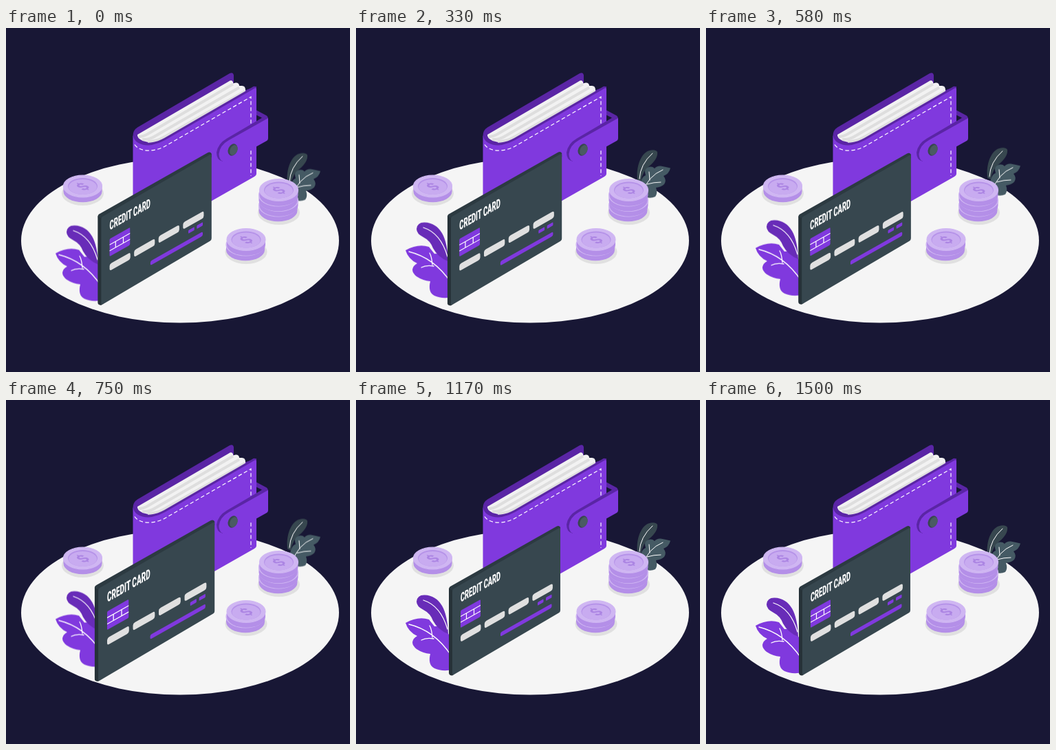
An HTML page that plays this animation: 500x500 px, repeating every 1.54 s.

```html
<!DOCTYPE html>
<html lang="en">
<head>
<meta charset="utf-8">
<title>Wallet and card</title>
<style>
  html, body { margin: 0; width: 100%; height: 100%; overflow: hidden; background: #181735; }
  svg { display: block; width: 100vw; height: 100vh; }
  text { font-family: Roboto, "Liberation Sans", sans-serif; font-weight: 900; }
  #card { transform-origin: 216px 292px; }
  .line { fill: none; stroke: #fff; stroke-linecap: round; }
  .flat { stroke-linecap: butt; }
</style>
</head>
<body>
<svg viewBox="0 0 500 500">
  <ellipse cx="253" cy="309" rx="231" ry="119.500" fill="#f5f5f5"/>

  <g id="wallet">
    <path fill="#5a25a5" d="M184.500 157Q184.500 148.500 191 144.500L325 66Q330 63.500 331 68.500V96L364 85V100L222 180L186 168Z"/>
    <path fill="#f2f2f2" d="M191 155L324 77.500Q328 74.500 330 78.500V80.500L334 79.500Q339 79.500 339 84L343 84Q348 84 348 90V94L230 161Q213 169 199 164Q190 160 191 155Z"/>
    <g fill="none" stroke="#dedede" stroke-width="4.200">
      <path d="M193 158Q199 158 206 154L330 81.500"/>
      <path d="M198 162Q208 163 217 157L339 86.500"/>
      <path d="M206 165Q219 165 229 159L348 91.500"/>
    </g>
    <path fill="#5a25a5" d="M187 158Q193 168 211 166.500Q221 165 230 160L358 86Q362 83 364 87V96L222 176L185 168Z"/>
    <path fill="#8039de" d="M184.500 156C186 167 199 172 212 170Q222 168 231 163L360 88.500Q364 86 364 89V212Q364 214.500 361 216L230 290.500L184.500 290Z"/>
    <path class="line flat" stroke-width="1.200" stroke-dasharray="5.500 3.500" d="M187 169.500C194 180 213 180.500 229 173L356 100V215"/>
    <path fill="#5a25a5" d="M364 119.500L379 127.500Q381 129 381 132L327 170L315 194Q306 192 306 181Q308 168 321 160.500L368 133L372 130.500L364 126.500Z"/>
    <path fill="#8039de" d="M381 131V160Q381 163 378 164.500L326 193.500Q310 198 309.500 183Q311 170 324 163Z"/>
    <ellipse cx="329.500" cy="177" rx="6.500" ry="9" transform="rotate(25 329.500 177)" fill="#37474f"/>
    <ellipse cx="331" cy="177.500" rx="5.300" ry="7.800" transform="rotate(25 331 177.500)" fill="#4a5b63"/>
  </g>

  <g id="dark" class="plant">
    <path fill="#37474f" d="M409 226C407 206 414 188 425 183.500Q435 180.500 438 185C439 193 433 200 427 205Q417 212 414 228Z"/>
    <path class="line" stroke-width="1" d="M412 224Q413 203 431 187"/>
    <path fill="#455a64" d="M413 232Q415 221 421 219Q418 210 424 207.500Q430 205 434 209Q437 205 443 205.500Q451 207 457 208.500Q455 217 447 220Q452 226 448 232Q444 236 436 237Q439 245 435 250Q429 253 422 251Z"/>
    <path class="line" stroke-width="1" d="M416 245Q424 220 446 211M427 226L426 214M423 232Q433 229 443 229"/>
  </g>

  <g id="coins"></g>

  <g id="violet" class="plant">
    <path fill="#8039de" d="M72 328Q90 318 106 323L114 333Q128 331 136 347L142 396Q124 399 114 394Q104 389 108 373Q97 372 88 366Q82 361 82 356Q83 350 89 347Q76 341 72 328Z"/>
    <path class="line" stroke-width="1.300" d="M77 330Q114 339 138 375M111 349Q110 337 107 332M113 351Q102 349 95 353"/>
    <path fill="#682cb8" d="M88 297Q89 287 100 287.500Q116 288 125 303Q133 317 134 344Q119 338 112 325Q108 314 98 309Q88 304 88 297Z"/>
    <path class="line" stroke-width="1.300" d="M98 295Q123 303 133 337"/>
  </g>

  <g id="card">
    <path fill="#2c3a41" d="M135 275Q135 272 138 270.500L291 184Q295 181.500 297 185V190L142 280Z"/>
    <path fill="#263238" d="M135 274L142 278V399L140 400.500Q135 400.500 135 396.500Z"/>
    <path fill="#37474f" d="M140 278Q140 275.500 142 274.300L294.500 186.500Q297 185 297 188V305.500Q297 308 295 309.200L142 399.300Q140 400.500 140 398Z"/>
    <g id="face" transform="matrix(1 -.565 0 1 140 276)">
      <text transform="translate(12 24.700) scale(.505 1)" font-size="18.300" fill="#fff">CREDIT CARD</text>
      <rect x="12" y="37" width="29" height="25" rx="1.500" fill="#8039de"/>
      <path class="line flat" stroke-width="1.200" d="M12 45.500H41M12 54H41M20.500 45.500V54M31.500 45.500V54"/>
      <g fill="#8039de">
        <rect x="124" y="88" width="8.500" height="4.800" rx="1"/>
        <rect x="136" y="88" width="8.500" height="4.800" rx="1"/>
        <rect x="70" y="101.500" width="74.500" height="6" rx="2"/>
      </g>
    </g>
  </g>
</svg>
<script>
const $ = id => document.getElementById(id);

// Coin stacks: the top face sits at (x, y), n coins deep.
const RX = 28, RY = 15.8, THICK = 7.5;

const ellipse = (x, y, rx, ry, attrs) =>
  `<ellipse cx="${x}" cy="${y}" rx="${rx}" ry="${ry}" ${attrs}/>`;

function coin(x, y) {
  const arc = `A${RX} ${RY} 0 0`;
  return `<path fill="#b48fe8" d="M${x - RX} ${y}v${THICK}${arc} 0 ${x + RX} ${y + THICK}v${-THICK}Z"/>` +
    ellipse(x, y, RX, RY, 'fill="#cfb6f2" stroke="#cfb6f2" stroke-width="1.2"') +
    ellipse(x, y, 21.5, 12, 'fill="#b592e8"') +
    ellipse(x, y + 1, 20.5, 11, 'fill="#c8abf0"');
}

function stack(x, y, n) {
  let out = ellipse(x, y + n * THICK + 3, 30.5, 17.5, 'fill="#e0e0e0"');
  for (let i = n - 1; i >= 0; i--) out += coin(x + (i % 2 ? -1 : 0), y + i * THICK);
  return out + `<text transform="matrix(.87 -.5 .87 .5 ${x} ${y + 0.5})" y="7.500"
    text-anchor="middle" font-size="21" style="font-weight:700" fill="#ac85e3">$</text>`;
}

$('coins').innerHTML = stack(111.5, 230, 1) + stack(396.5, 235.5, 4) + stack(349, 307.5, 2);

$('face').insertAdjacentHTML('beforeend', [0, 1, 2, 3].map(i =>
  `<rect x="${12 + i * 34.8}" y="72.800" width="29.500" height="9.800" rx="2.800" fill="#e0e0e0"/>`).join(''));

// Motion: [ms, value] pairs, linear in between, held at 24 steps a second.
const BEAT = [[0, 1], [150, 1.1], [450, 1], [600, 1], [750, 1.1], [900, 1], [1500, 1]];
const FLOAT = [[0, 0], [750, -10], [1500, 0]];
const LOOP = 1540, STEPS = 36, LEAD = 33;

function at(keys, t) {
  const i = Math.max(1, keys.findIndex(k => k[0] >= t));
  const [t0, a] = keys[i - 1], [t1, b] = keys[i];
  return a + (b - a) * (t - t0) / (t1 - t0);
}

function play(el, keys, css) {
  const frames = [];
  for (let i = 0; i <= STEPS; i++) {
    const t = i * 1500 / STEPS;
    const start = Math.max(0, Math.round(t / 10) * 10 - 1);
    frames.push({
      offset: start / LOOP,
      transform: css(at(keys, Math.min(t + LEAD, 1500))),
      easing: 'steps(1, end)'
    });
  }
  frames.push({ ...frames[STEPS], offset: 1 });
  el.animate(frames, { duration: LOOP, iterations: Infinity });
}

play($('card'), BEAT, s => `scale(${s})`);
document.querySelectorAll('.plant').forEach(el => play(el, FLOAT, y => `translateY(${y}px)`));
</script>
</body>
</html>
```
